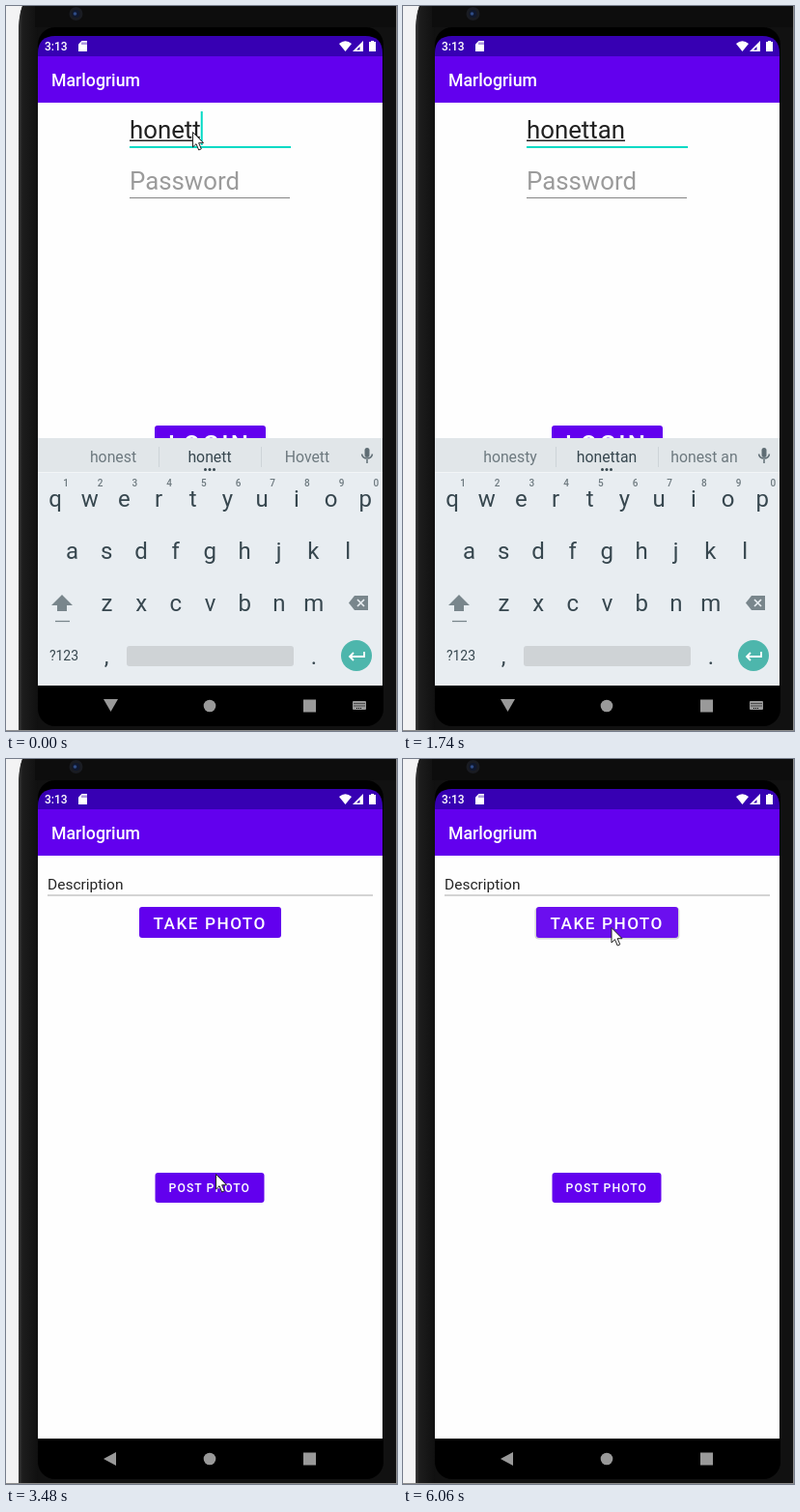
These frames come from a looping animation (405 px wide and 750 px high, 8 s). An HTML page:

```html
<!DOCTYPE html>
<html lang="en">
<head>
<meta charset="utf-8">
<style>
  html, body { margin: 0; width: 100%; height: 100%; overflow: hidden; background: #f3f3f4; }
  svg { display: block; width: 405px; height: 750px; font-family: Roboto, sans-serif; }
  .mid { text-anchor: middle; }
  .medium { font-weight: 500; }
  .caps { font-weight: 500; letter-spacing: .0893em; fill: #fff; }
  .field { font-size: 25.8px; }
  .key { font-size: 24px; fill: #37474f; }
  .digit { font-size: 10px; font-weight: 500; fill: #6d797f; }
  .hint { font-size: 15.8px; fill: #6d797f; }
</style>
</head>
<body>
<svg viewBox="0 0 405 750">
  <defs>
    <linearGradient id="edge">
      <stop offset="0" stop-color="#3a3a3a"/>
      <stop offset=".2" stop-color="#1d1d1d"/>
      <stop offset="1" stop-color="#101010"/>
    </linearGradient>
    <clipPath id="takeShape"><rect x="138" y="153" width="147" height="32" rx="3"/></clipPath>
  </defs>

  <!-- phone body -->
  <path d="M17 0H404V749H13V30Q13 10 17 0Z" fill="#111"/>
  <path d="M17 0H33V749H13V30Q13 10 17 0Z" fill="url(#edge)"/>
  <rect x="30" width="374" height="22" fill="#0d0d0d"/>
  <rect x="33" y="22" width="358" height="723" rx="18" fill="#000"/>
  <path d="M404.5 0V749M0 749.5H405" stroke="#8c8c8c"/>
  <circle cx="72.500" cy="8" r="7" fill="#1a1c22"/>
  <circle cx="72.500" cy="8" r="4" fill="#10182e"/>
  <circle cx="71.500" cy="8" r="1.800" fill="#2f4c86"/>

  <!-- screen -->
  <rect x="33" y="90" width="357" height="613" fill="#fefefe"/>
  <path d="M33 52V49Q33 31 51 31H372Q390 31 390 49V52Z" fill="#3700b3"/>
  <rect x="33" y="52" width="357" height="48" fill="#6200ee"/>
  <g fill="#fff">
    <text x="40" y="46" font-size="12" class="medium">3:13</text>
    <path d="M78.500 36H84V47H75V39.500Z"/>
    <path d="M345 39Q351.500 33.500 358 39L351.500 47Z"/>
    <path d="M370 36V47H359Z"/>
    <path d="M376 37H378V36H381V37H383V47H376Z"/>
    <text x="47" y="83" font-size="17.700" class="medium">Marlogrium</text>
  </g>
  <path d="M79 37.500V40M81 37.500V40M83 37.500V40" stroke="#3700b3" stroke-width=".8"/>
  <path d="M366.500 42V45.500H363Z" fill="#3700b3"/>

  <g id="login">
    <text id="user" class="field" x="128" y="137" fill="#212121"></text>
    <rect id="underline" x="128" y="138.500" height="1.500" fill="#212121"/>
    <rect x="128" y="145" width="167" height="2" fill="#03dac5"/>
    <rect id="caret" y="109" width="2" height="35" fill="#03dac5"/>
    <text class="field" x="128" y="189.500" fill="#9b9b9b">Password</text>
    <rect x="128" y="198" width="166" height="1" fill="#858585"/>
    <rect x="154" y="434" width="115" height="30" rx="3" fill="#6200ee"/>
    <text class="caps" x="168" y="462" font-size="25.700">LOGIN</text>

    <rect x="33" y="447" width="357" height="256" fill="#e8edf1"/>
    <rect x="33" y="447" width="357" height="35" fill="#e1e6e9"/>
    <path d="M33 482.500H390" stroke="#f2f5f7"/>
    <path d="M158.500 456V477M264.500 456V477" stroke="#ced4d8"/>
    <g class="mid">
      <text id="left" class="hint" x="111" y="471.500"></text>
      <text id="typed" class="hint" x="211" y="471.500" style="fill:#37474f"></text>
      <text id="right" class="hint" x="312" y="471.500"></text>
    </g>
    <g fill="#37474f">
      <circle cx="206.500" cy="479.500" r="1.500"/>
      <circle cx="211" cy="479.500" r="1.500"/>
      <circle cx="215.500" cy="479.500" r="1.500"/>
    </g>
    <rect x="371.500" y="457" width="5" height="10" rx="2.500" fill="#5f6d74"/>
    <path d="M368.500 463.500A5.600 5.600 0 0 0 379.500 463.500M374 469V473" fill="none" stroke="#5f6d74" stroke-width="1.500"/>
    <g id="keys" class="mid"></g>
    <path d="M58 609L69 620H63V626H53V620H47Z" fill="#79868c"/>
    <path d="M51 636.500H66" stroke="#79868c" stroke-width="1.300"/>
    <path d="M361 610H375V625H361L355 617.500Z" fill="#79868c"/>
    <path d="M364 614L371 621M371 614L364 621" stroke="#e8edf1" stroke-width="1.700"/>
    <rect x="125" y="662" width="173" height="21" rx="3" fill="#cfd3d6"/>
    <circle cx="363" cy="672" r="16" fill="#4db6ac"/>
    <path d="M371 668V673H356M360 669L356 673L360 677" fill="none" stroke="#fff" stroke-width="1.800"/>
    <g fill="#999">
      <path d="M101 717H116L108.500 730Z"/>
      <rect x="359" y="719" width="14" height="9" rx="1"/>
    </g>
    <path d="M360.500 721.500H372M360.500 724H372M363 726.500H369" stroke="#000" stroke-dasharray="1 1"/>
  </g>

  <g id="post">
    <text x="43" y="134.500" font-size="15.500" fill="#252525">Description</text>
    <path d="M43 141H380" stroke="#a9a9a9"/>
    <rect id="lift" x="136.500" y="153.500" width="150" height="33" rx="4" fill="#000" opacity=".16"/>
    <rect x="138" y="153" width="147" height="32" rx="3" fill="#6200ee"/>
    <circle id="ripple" cx="216" cy="174" fill="#fff" opacity=".06" clip-path="url(#takeShape)"/>
    <text class="caps" x="152.500" y="176" font-size="17.200">TAKE PHOTO</text>
    <rect x="154.500" y="428" width="113" height="31" rx="3" fill="#6200ee"/>
    <text class="caps" x="168.500" y="448" font-size="12.200">POST PHOTO</text>
    <path d="M114 717V731L101 724Z" fill="#999"/>
  </g>

  <circle cx="211" cy="724" r="6.300" fill="#999"/>
  <rect x="308" y="717.500" width="13" height="13" fill="#999"/>
  <path id="mouse" d="M.5 .5V16L4 12.700L6.700 19L9.300 17.800L6.600 11.700H11.500Z" fill="#fff" stroke="#222"/>
</svg>
<script>
const $ = id => document.getElementById(id);
const LOOP = 8000;

// Each row: start time, then the values held from that time on
const typing = [
  [0, 'honett', 'honest', 'honett', 'Hovett'],
  [120, 'honetta', 'honest', 'honett', 'Hovett'],
  [260, 'honettan', 'honours', 'honetta', 'honest a'],
  [410, 'honettan', 'honesty', 'honettan', 'honest an']
];
const mousePath = [
  [0, 193, 130], [680, 240, 300], [800, 284, 487], [950, 298, 560],
  [1070, 318, 709], [1190, 318, 760], [2140, 242, 459], [2540, 206, 330],
  [2660, 176, 218], [2780, 189, 236], [2930, 204, 291], [3080, 222, 360],
  [3200, 234, 405], [3350, 230, 438], [3480, 217, 429], [3600, 222, 270],
  [3720, 225, 156], [3870, 225, 151], [4020, 215, 173], [4170, 215.500, 174]
];
const caretBlink = [[0, true], [800, false], [1310, true], [1740, false]];
const press = [[0, 0], [5790, 24], [5910, 60], [6060, 100]];

const at = (steps, t) => steps.findLast(step => step[0] <= t).slice(1);
const show = (id, on) => $(id).setAttribute('display', on ? 'inline' : 'none');

function addKey(label, x, y, cls = 'key') {
  const key = document.createElementNS('http://www.w3.org/2000/svg', 'text');
  key.setAttribute('class', cls);
  key.setAttribute('x', x);
  key.setAttribute('y', y);
  key.textContent = label;
  $('keys').append(key);
  return key;
}

[['qwertyuiop', 51, 518], ['asdfghjkl', 68.500, 572], ['zxcvbnm', 104.500, 626]].forEach(([row, x, y]) =>
  [...row].forEach((letter, i) => addKey(letter, x + i * 35.700, y)));
[...'1234567890'].forEach((digit, i) => addKey(digit, 62 + i * 35.700, 497, 'digit'));
addKey(',', 104, 681);
addKey('.', 319, 681);
addKey('?123', 60, 677).style.fontSize = '14px';

function draw(now) {
  const t = now % LOOP;
  const onLogin = t < 2140;
  show('login', onLogin);
  show('post', !onLogin);

  if (onLogin) {
    ['user', 'left', 'typed', 'right'].forEach((id, i) => $(id).textContent = at(typing, t)[i]);
    const width = $('user').getComputedTextLength();
    $('underline').setAttribute('width', width);
    $('caret').setAttribute('x', 128 + width);
    show('caret', at(caretBlink, t)[0]);
  }

  const [radius] = at(press, t);
  $('ripple').setAttribute('r', radius);
  show('lift', radius > 0);
  $('mouse').setAttribute('transform', `translate(${at(mousePath, t)})`);
  requestAnimationFrame(draw);
}
requestAnimationFrame(draw);
</script>
</body>
</html>
```
